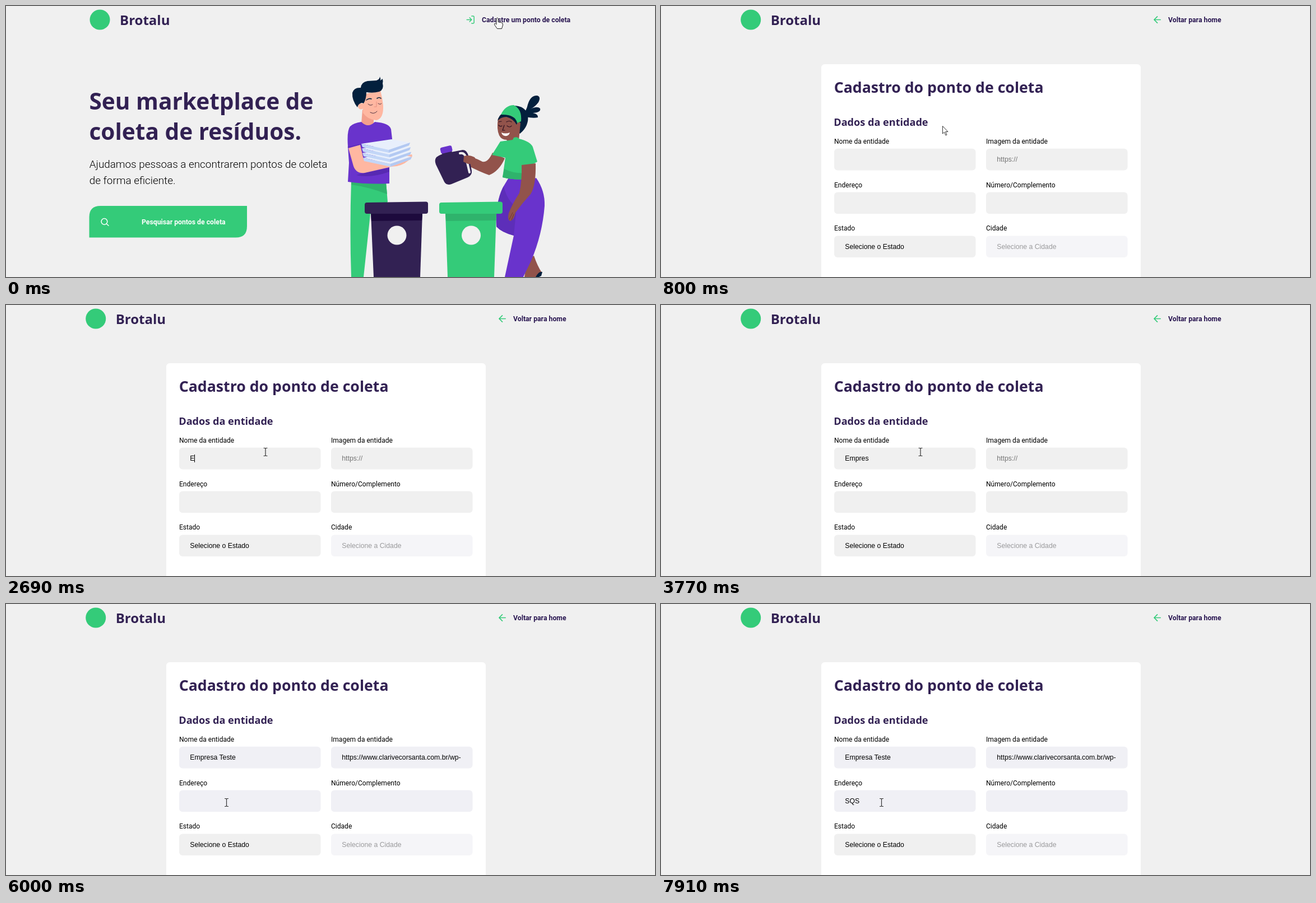
These frames come from a looping animation (1158 by 484 pixels, 8 s). An HTML page:

```html
<!DOCTYPE html>
<html lang="pt-BR">
<head>
<meta charset="utf-8">
<title>Cadastro</title>
<style>
html, body { margin: 0; width: 100%; height: 100%; overflow: hidden; background: #f0f0f0; }
svg { display: block; }
text { white-space: pre; }
.title { font-family: "Open Sans", "Noto Sans", sans-serif; font-weight: 700; fill: #322153; }
.link { font: 700 12.25px Roboto, sans-serif; fill: #281550; }
.lead { font: 300 18.85px Roboto, sans-serif; }
.label { font: 400 12.05px Roboto, sans-serif; }
.input { font: 12.25px "Liberation Sans", Arial, sans-serif; }
.icon { fill: none; stroke: #34cb79; stroke-width: 2; stroke-linecap: round; stroke-linejoin: round; }
.line { fill: none; stroke-linecap: round; }
.green { fill: #34cb79; }
.purple { fill: #6933cc; }
.night { fill: #322153; }
.hair { fill: #03203d; }
.pale { fill: #ffb7a1; }
.brown { fill: #92534b; }
</style>
</head>
<body>
<svg width="1158" height="484" viewBox="0 0 1158 484">
  <defs>
    <clipPath id="clip"><rect x="599" y="255" width="214" height="39"/></clipPath>
  </defs>

  <g id="brand">
    <circle class="green" cx="167.5" cy="24.5" r="18"/>
    <text class="title" x="203" y="34" font-size="24">Brotalu</text>
  </g>

  <g id="home">
    <path class="icon" transform="translate(820 15.8) scale(.72)" d="M15 3h4a2 2 0 0 1 2 2v14a2 2 0 0 1-2 2h-4M10 17l5-5-5-5M15 12H3"/>
    <text class="link" x="849" y="28.5">Cadastre um ponto de coleta</text>
    <g class="title" font-size="40.6">
      <text x="148.5" y="185">Seu marketplace de</text>
      <text x="148.5" y="239">coleta de resíduos.</text>
    </g>
    <text class="lead" x="148.8" y="288.5">Ajudamos pessoas a encontrarem pontos de coleta</text>
    <text class="lead" x="148.8" y="317.8">de forma eficiente.</text>
    <path class="green" d="M168.5 357H430V393.5Q430 413.5 410 413.5H148.500V377Q148.500 357 168.500 357Z"/>
    <path class="line" stroke="#fff" stroke-width="1.5" d="M180.8 385a5.4 5.4 0 1 1-10.8 0a5.4 5.4 0 1 1 10.8 0M179.5 389.3L183 392.3"/>
    <text class="link" x="242" y="390" style="fill:#fff">Pesquisar pontos de coleta</text>

    <!-- man -->
    <path class="green" d="M616 312L678 314L681 350L650 372L638 484H616Q613 400 616 312Z"/>
    <path fill="#2fb36c" d="M616 314L678 316L680 336Q650 324 616 319Z"/>
    <path fill="#f39f8c" d="M636 185L656 200V209Q646 221 634 210Z"/>
    <path class="pale" d="M636 158L668 151Q672 165 673 178Q674 201 661 204Q645 203 637 191Z"/>
    <circle class="pale" cx="633.5" cy="179" r="5.5"/>
    <path class="hair" d="M627 181Q617 168 618 155Q621 145 633 146Q634 136 645 134L661 133Q667 131 667 126Q669 130 668 133L672 130Q673 135 672 138Q675 149 666 153Q655 156 643 154Q643 166 638 174Q635 172 632 174Q628 176 627 181Z"/>
    <path class="line" stroke="#03203d" stroke-width="1.6" d="M643 168q5-4 9-2M662 165q4-3 7 0"/>
    <path class="line" stroke="#4b3040" d="M646 175q4 4 8 1M664 174q4 3 6 0M650 190q7 4 12-2"/>
    <path class="line" stroke="#e58f80" d="M661 171v9h-4"/>
    <path class="purple" d="M634 207Q646 219 658 207Q684 209 687 220L690 246L684 250V317Q645 319 610 314L612 280L610 251Q608 222 614 215Q620 209 634 207Z"/>
    <path fill="#5729b2" d="M640 298L684 289V296Q650 308 625 302Z"/>
    <path class="pale" d="M611 254L632 248L638 274L690 278Q708 268 724 265Q727 270 718 276Q705 287 688 287L640 298Q625 300 620 286Z"/>
    <path class="line" stroke="#5729b2" d="M610 252L633 247"/>
    <g id="paper"></g>

    <!-- woman -->
    <path class="brown" d="M930 452L942 446Q948 464 956 476L947 484H925Z"/>
    <path class="hair" d="M945 484Q951 473 957 475L955 482L951 484Z"/>
    <path class="purple" d="M898 305Q935 313 946 307Q962 330 961 357Q957 408 937 455L923 484H890L906 410Q884 404 875 394Q873 352 886 325Z"/>
    <path fill="#5d2eb9" d="M888 322Q895 350 911 358L906 410Q884 404 875 394Q873 352 888 322Z"/>
    <path class="hair" d="M905 178Q926 178 931 194Q934 214 917 228L902 215Z"/>
    <path class="hair" d="M922 194Q929 186 931 176Q936 159 948 160Q955 162 950 172Q944 180 936 184Q948 178 953 183Q955 190 940 191Q950 193 949 199Q941 201 927 198Z"/>
    <path class="brown" d="M878 201Q888 187 905 196L918 209L915 240L896 243L893 239Q884 239 880 231Q875 220 878 201Z"/>
    <path class="hair" d="M877 205Q880 194 888 190L914 203Q913 209 911 212Q905 201 893 198Q883 198 877 205Z"/>
    <path class="green" d="M883 194Q891 177 906 177Q921 184 919 206L912 209Q909 193 883 194Z"/>
    <path class="line" stroke="#2b1020" stroke-width="1.2" d="M879 213q3 3 6 1M894 214q5 4 8 0M879 207l5-1M893 207q5-3 9 0M889 213l-3 9h4"/>
    <path fill="#fff" d="M884 226Q891 229 899 226Q897 233 890 232Q885 231 884 226Z"/>
    <path class="brown" d="M868 262L890 272Q880 295 862 302Q845 296 822 284Q815 275 819 267Q836 270 850 278Q860 280 868 262Z"/>
    <path class="green" d="M882 242L904 239L906 235Q913 233 915 237Q936 242 940 252L948 278L938 284L942 307Q915 313 886 306L891 271L867 266Z"/>
    <path fill="#2fb36c" d="M889 291Q910 302 941 297L942 307Q915 313 886 306Z"/>
    <path class="brown" d="M920 284L945 281Q946 320 936 336Q922 351 909 369Q907 381 900 384Q894 383 897 370Q903 354 916 334Q921 310 920 284Z"/>
    <path class="line" stroke="#71382f" d="M898 381l6-12M902 382l4-10"/>

    <!-- jug -->
    <path class="night" d="M768 270Q775 264 794 261L815 257Q823 257 826 270L831 294Q832 302 824 306L795 318Q786 321 782 314L767 283Q764 275 768 270Z"/>
    <path class="line" stroke="#f0f0f0" stroke-width="4" d="M810 263Q818 261 821 271L827 297"/>
    <rect class="night" x="778" y="258" width="18" height="10" transform="rotate(-13 787 263)"/>
    <rect class="purple" x="775" y="251" width="21" height="11" rx="3" transform="rotate(-13 785 256)"/>
    <path class="brown" d="M817 268Q828 265 837 271L836 282L824 282L816 278Z"/>

    <!-- bins -->
    <path class="night" d="M651 369H743L739 484H656Z"/>
    <path fill="#1d0a3d" d="M651 370H743L742 383L652 384Z"/>
    <path class="night" d="M644 351L749 349.5Q753 349.5 753 353V367Q753 371 749 371H644Q640 371 640 367V355Q640 351 644 351Z"/>
    <path class="green" d="M784 369H875L871 484H788Z"/>
    <path fill="#2fb36c" d="M784 370H875L874.5 383L785 384Z"/>
    <path class="green" d="M777 351L882 349.5Q886 349.5 886 353V367Q886 371 882 371H777Q773 371 773 367V355Q773 351 777 351Z"/>
    <circle cx="697.5" cy="409.5" r="17" fill="#f0f0f0"/>
    <circle cx="830" cy="409.5" r="17" fill="#f0f0f0"/>
  </g>

  <g id="form">
    <path id="back" class="icon" transform="translate(875.8 14.8) scale(.81)" d="M19 12H5M12 19l-7-7 7-7"/>
    <text class="link" x="905" y="28.5">Voltar para home</text>
    <rect x="286" y="104" width="570" height="400" rx="6" fill="#fff"/>
    <text class="title" x="308.7" y="155" font-size="26.7">Cadastro do ponto de coleta</text>
    <text class="title" x="308.3" y="214" font-size="18.1">Dados da entidade</text>
    <g id="fields"></g>
    <rect id="caret" width="1" height="14"/>
  </g>

  <g id="hand"><path fill="#fafafa" stroke="#222" d="M875 30V22.5Q876.5 19.5 878.3 22.5V28.5L883.5 29.5Q887 30 886.5 34L884.5 40.5H876.5L871.5 33.5Q871 30.5 873.5 31.5L875 33Z"/></g>
  <g id="arrow"><path fill="#fff" stroke="#222" stroke-width=".9" d="M.5 .5V14L3.6 11.2L6 17L8 16L5.7 10.5H10Z"/></g>
  <g id="beam"><path class="line" stroke="#333" stroke-width="1.2" d="M-3-7H-1L0-6L1-7H3M0-6V6M-3 7H-1L0 6L1 7H3"/></g>
</svg>
<script>
const $ = id => document.getElementById(id);
const LOOP = 8000;

// Stack of four folded sheets
let sheets = '';
for (let i = 3; i >= 0; i--) {
  sheets += `<g transform="translate(${i} ${i * 8.3})">
    <path fill="#e8effc" d="M634 246L688 238L720 244L683 257Z"/>
    <path fill="#c3d6f7" d="M634 246L683 257L721 244L719 249L683 262L636 252Z"/>
    <path fill="#b3c9f2" d="M683 257L721 244L719 249L683 262Z"/></g>`;
}
$('paper').innerHTML = sheets;

const FIELDS = [
  ['Nome da entidade', ''], ['Imagem da entidade', 'https://', '#757575'],
  ['Endereço', ''], ['Número/Complemento', ''],
  ['Estado', 'Selecione o Estado', '#000'], ['Cidade', 'Selecione a Cidade', '#9a9a9c']
];
$('fields').innerHTML = FIELDS.map(([label, value, color = '#000'], i) => {
  const x = i % 2 ? 580 : 309, y = 254.8 + 77.8 * (i >> 1);
  return `<text class="label" x="${x}" y="${y - 9}">${label}</text>
    <rect x="${x}" y="${y}" width="252.5" height="38.6" rx="6" fill="${i == 5 ? '#f5f5f8' : '#f0f0f0'}"/>
    <text class="input" id="field${i}" x="${x + 19.3}" y="${y + 23.4}" fill="${color}">${value}</text>`;
}).join('');
$('field1').setAttribute('clip-path', 'url(#clip)');
const boxes = [...document.querySelectorAll('#fields rect')].slice(0, 4);

// Timelines: [start, value], each held until the next
const name = [[0, ''], [2690, 'E'], [2960, 'Emp'], [3090, 'Empre'], [3230, 'Empres'], [3910, 'Empresa'],
  [4030, 'Empresa '], [4150, 'Empresa T'], [4300, 'Empresa Te'], [4550, 'Empresa Test'], [4690, 'Empresa Teste']];
const link = [[0, 'https://'], [5490, 'https://' + 'www.clarivecorsanta.com.br/wp-']];
const street = [[0, ''], [6700, 'S'], [6950, 'SQ'], [7380, 'SQS']];
const focus = [[0, 0], [4810, 1], [6150, 2]];
const blink = [[0, 0], [1190, 1], [1720, 0], [2290, 1], [3770, 0], [3910, 1],
  [5340, 0], [5490, 1], [6000, 0], [6150, 1], [7910, 0]];
const pointer = [[0, ['hand', 0, 0]], [420, ['arrow', 770, 72]], [540, ['arrow', 610, 148]],
  [660, ['arrow', 523, 188]], [800, ['arrow', 502, 214]], [930, ['arrow', 480, 237]],
  [1050, ['beam', 466, 260]], [1190, ['beam', 463, 262.5]], [5760, ['beam', 440, 290]],
  [5880, ['arrow', 408, 328]], [6000, ['beam', 393.5, 354.5]]];

const at = (line, t) => line.findLast(step => step[0] <= t)[1];
const show = (id, on) => $(id).style.display = on ? '' : 'none';

function draw(t) {
  const home = t < 130, pasted = t >= 5490;
  show('home', home);
  show('form', !home);
  show('back', t >= 270);
  $('brand').setAttribute('transform', `translate(${home ? 0 : -7.3} 0)`);

  [name, link, street].forEach((line, i) => $('field' + i).textContent = at(line, t));
  $('field1').setAttribute('fill', pasted ? '#000' : '#757575');
  for (const box of boxes) box.setAttribute('fill', pasted ? '#f0f0f5' : '#f0f0f0');

  const active = at(focus, t), text = $('field' + active);
  const end = active == 1 && !pasted ? 0 : text.getComputedTextLength();
  show('caret', at(blink, t));
  $('caret').setAttribute('x', Math.min(812, Math.round(+text.getAttribute('x') + end)));
  $('caret').setAttribute('y', active == 2 ? 345 : 267);

  const [shape, x, y] = at(pointer, t);
  for (const id of ['hand', 'arrow', 'beam']) show(id, id == shape);
  $(shape).setAttribute('transform', `translate(${x} ${y})`);
}

function tick() {
  draw(performance.now() % LOOP);
  requestAnimationFrame(tick);
}
tick();
</script>
</body>
</html>
```
